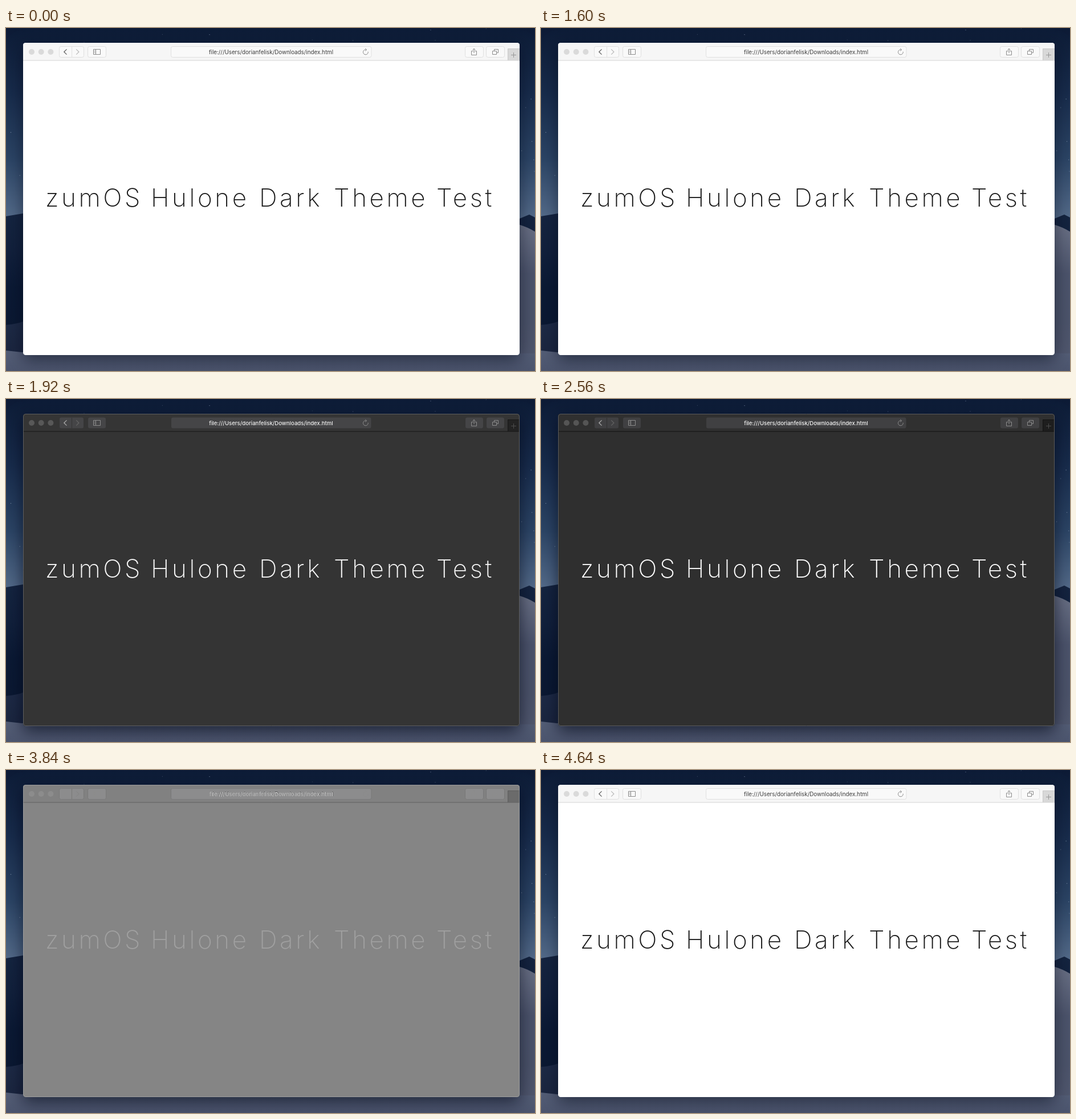
An HTML page with a canvas that plays this animation: 928x603 px, repeating every 5.6 s.

```html
<!DOCTYPE html>
<html lang="en">
<head>
<meta charset="utf-8">
<title>Dark Theme Test</title>
<style>
html, body { margin: 0; width: 100%; height: 100%; overflow: hidden; background: #0d1b36; }
canvas { display: block; }
</style>
</head>
<body>
<canvas id="stage" width="928" height="603"></canvas>
<script>
const W = 928, H = 603, LOOP = 5600;
const STEP = 160, FADE = 385, TO_DARK = 1545, TO_LIGHT = 3680;
const WIN = { x: 30, y: 26, w: 871, h: 549, r: 4.5, bar: 31 };
const RIGHT = WIN.x + WIN.w;
const MID = 42;
const ADDRESS = 'file:///Users/dorianfelisk/Downloads/index.html';

const LIGHT = {
  page: '#ffffff', bar: '#f6f6f6', line: '#d2d2d2',
  button: '#f9f9f9', rim: '#e0e0e0', dot: '#dadada',
  back: '#5c5c5c', forward: '#b9b9b9', icon: '#8c8c8c',
  tab: '#d8d8d8', tabRim: '#c9c9c9', plus: '#979797',
  url: '#3c3c3c', urlFont: '400 9.8px', title: '#1b1b1b', shadow: 0.5
};
const DARK = {
  page: '#2f2f2f', bar: '#303030', line: '#111111', edge: '#5a5a5a',
  button: '#404042', dot: '#555555',
  back: '#b0b0b0', forward: '#636363', icon: '#8c8c8c',
  tab: '#1e1e1e', tabRim: '#121212', plus: '#4c4c4c',
  url: '#f5f5f5', urlFont: '500 9.6px', title: '#ffffff', shadow: 0.65
};

const clamp = v => Math.min(1, Math.max(0, v));

function seeded(seed) {
  return () => (seed = seed * 16807 % 2147483647) / 2147483647;
}

// Vertical gradient with evenly spaced colours
function ramp(g, top, bottom, ...colors) {
  const fill = g.createLinearGradient(0, top, 0, bottom);
  colors.forEach((c, i) => fill.addColorStop(i / (colors.length - 1), c));
  return fill;
}

function box(g, x, y, w, h, r, fill, rim) {
  g.beginPath();
  g.roundRect(x, y, w, h, r);
  if (fill) { g.fillStyle = fill; g.fill(); }
  if (rim) { g.strokeStyle = rim; g.stroke(); }
}

function trace(g, color, path, width = 1) {
  g.strokeStyle = color;
  g.lineWidth = width;
  g.stroke(new Path2D(path));
}

// Fills the ground below a ridge line
function ground(g, fill, ridge) {
  g.fillStyle = fill;
  g.fill(new Path2D(`${ridge}V${H}H0V${H}Z`));
}

function drawDesert(g) {
  g.fillStyle = ramp(g, 0, 345, '#0c1a35', '#172a4a', '#2b4364', '#576d8c');
  g.fillRect(0, 0, W, H);

  const random = seeded(12);
  for (let i = 0; i < 70; i++) {
    g.fillStyle = `rgba(210,225,245,${0.15 + 0.35 * random()})`;
    g.fillRect(random() * W, random() * 300, 1.2, 1.2);
  }

  // mountains
  ground(g, ramp(g, 327, 520, '#14233f', '#111f3b', '#0a1833', '#0a1731'),
    `M0 331L30 326H${W / 2}L901 335 918 328 ${W} 333`);

  // far dunes: left, then right
  ground(g, ramp(g, 516, 570, '#1d2945', '#1a243e'), 'M0 522Q20 520 30 516H464');
  g.fillStyle = ramp(g, 346, H, '#686e83', '#4b526a', '#4b5269', '#51576e');
  g.fill(new Path2D(`M464 346H901Q915 350 ${W} 358V${H}H464Z`));

  // foreground sand
  ground(g, ramp(g, 567, H, '#535c75', '#4b536c'), `M0 567Q30 571 60 572H${W}`);
}

function drawButtons(g, t) {
  const inset = t.rim ? 0 : 0.5;
  const button = (x, w) => box(g, x + inset, MID - 9.5, w - 2 * inset, 19, 3, t.button, t.rim);
  g.lineWidth = 1;
  button(93.5, 43);
  for (const x of [143.5, 805.5, 842.5]) button(x, 32);
  button(289.5, 351.5);
  trace(g, t.rim || t.bar, 'M115.5 33V51.5');
}

function drawIcons(g, t) {
  for (let i = 0; i < 3; i++) {
    g.fillStyle = t.dot;
    g.beginPath();
    g.arc(45 + i * 16.7, MID, 5, 0, 2 * Math.PI);
    g.fill();
  }
  trace(g, t.back, 'M106.5 37.4l-4.7 4.6 4.7 4.6', 1.2);
  trace(g, t.forward, 'M123.2 37.4l4.7 4.6-4.7 4.6', 1.2);

  // sidebar, share, tabs, reload
  trace(g, t.icon, 'M153.5 37.5h12v9h-12zM157.5 37.5v9');
  trace(g, t.icon, 'M154.5 39.7h2m-2 2h2m-2 2h2', 0.7);
  trace(g, t.icon, 'M819.5 40.5h-3v7h9v-7h-3M821 44v-7.7m-2.4 2.3l2.4-2.4 2.4 2.4');
  trace(g, t.icon, 'M853.5 40.5h7v6h-7zM856.5 40.5v-3h7v6h-3');
  trace(g, t.icon, 'M635.2 41.7a4.4 4.4 0 1 1-2.8-3.4M630.2 36l2.4 2.2-2.4 2.2');
}

function drawText(g, t) {
  g.fillStyle = t.url;
  g.textAlign = 'center';
  g.font = `${t.urlFont} Inter, sans-serif`;
  g.fillText(ADDRESS, 465, 46);

  g.fillStyle = t.title;
  g.textAlign = 'left';
  g.font = '150 44px Inter, sans-serif';
  g.letterSpacing = '4.6px';
  const words = { zumOS: 69, Hulone: 254, Dark: 444, Theme: 575, Test: 755 };
  for (const word in words) g.fillText(word, words[word], 314);
  g.letterSpacing = '0px';
}

function drawWindow(g, t) {
  const { x, y, w, h, r, bar } = WIN;
  g.save();
  g.shadowColor = `rgba(0,5,20,${t.shadow})`;
  g.shadowBlur = 28;
  g.shadowOffsetY = 9;
  box(g, x, y, w, h, r, t.page);
  g.restore();

  g.save();
  g.beginPath();
  g.roundRect(x, y, w, h, r);
  g.clip();
  g.fillStyle = t.bar;
  g.fillRect(x, y, w, bar);
  g.fillStyle = t.tab;
  g.fillRect(RIGHT - 21, 36, 21, 21);
  trace(g, t.tabRim, `M${RIGHT - 20.5} 57V36.5H${RIGHT}`);
  trace(g, t.plus, 'M886 47.5h9M890.5 43v9');
  trace(g, t.line, `M${x} 57h${w}`);
  g.restore();

  drawButtons(g, t);
  drawIcons(g, t);
  drawText(g, t);
  g.lineWidth = 1;
  if (t.edge) box(g, x + 0.5, y + 0.5, w - 1, h - 1, r, null, t.edge);
}

function render(t) {
  const c = document.createElement('canvas');
  c.width = W;
  c.height = H;
  const g = c.getContext('2d');
  drawDesert(g);
  drawWindow(g, t);
  return c;
}

const light = render(LIGHT), dark = render(DARK);
const stage = document.getElementById('stage').getContext('2d');
const start = performance.now();

// Linear cross-fades, held for one step at a time
function darkness(time) {
  const held = Math.floor(time / STEP) * STEP;
  return clamp((held - TO_DARK) / FADE) * (held >= STEP * 11) - clamp((held - TO_LIGHT) / FADE);
}

function frame() {
  stage.globalAlpha = 1;
  stage.drawImage(light, 0, 0);
  stage.globalAlpha = darkness((performance.now() - start) % LOOP);
  stage.drawImage(dark, 0, 0);
  requestAnimationFrame(frame);
}
frame();
</script>
</body>
</html>
```
